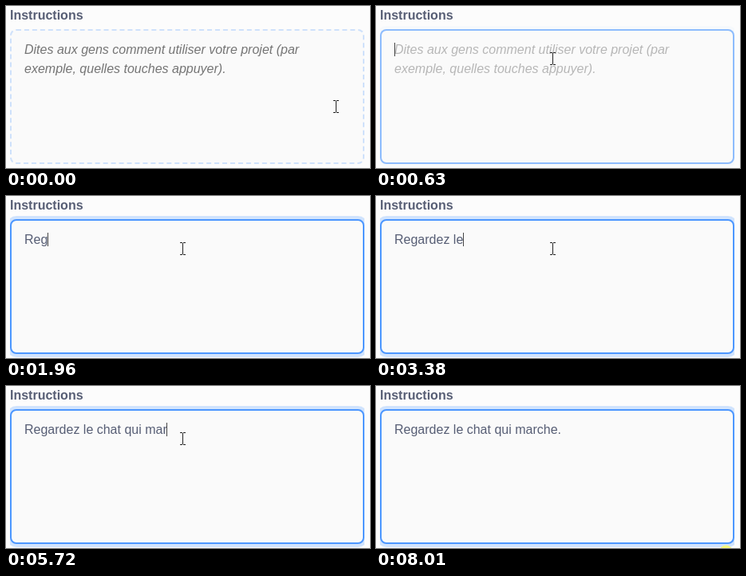
An HTML page that plays this animation: 456 by 203 pixels, repeating every 8090 ms.

```html
<!DOCTYPE html>
<html lang="fr">
<head>
<meta charset="utf-8">
<title>Instructions</title>
<style>
  html, body { margin: 0; width: 100%; height: 100%; overflow: hidden; background: #fcfcfc; }
  #stage { position: relative; width: 456px; height: 203px; overflow: hidden; }
  #clip { position: absolute; left: 5px; top: 20px; width: 444px; height: 183px; overflow: hidden; }
  #field {
    box-sizing: border-box; position: absolute; top: 9px; width: 444px; height: 169px;
    border: 2px dashed; border-radius: 8px; background: #fafafa;
  }
  svg { position: absolute; left: 0; top: 0; }
  text { font: 16px "Liberation Sans", Arial, sans-serif; fill: #575e75; white-space: pre; }
  .title { font-weight: bold; }
  #hint text { font-style: italic; fill: #757575; }
  #pointer { fill: none; stroke: #222; shape-rendering: crispEdges; }
  #caret { fill: #444; shape-rendering: crispEdges; }
</style>
</head>
<body>
<div id="stage">
  <div id="clip"><div id="field"></div></div>
  <svg width="456" height="203">
    <text class="title" x="5" y="17">Instructions</text>
    <g id="hint">
      <text x="23" y="60">Dites aux gens comment utiliser votre projet (par</text>
      <text x="23" y="84">exemple, quelles touches appuyer).</text>
    </g>
    <text id="typed" x="23" y="60"></text>
    <rect id="caret" y="46" width="1" height="17"/>
    <path id="pointer" d="M-3-7.5h3m1 0h3M.5-7v14M-3 7.5h3m1 0h3"/>
    <circle id="click" cx="438.5" cy="208.5" r="9" fill="#ffff50" opacity=".75"/>
  </svg>
</div>
<script>
const LOOP = 8090, TICK = 80, TEXT_X = 23;
const SENTENCE = 'Regardez le chat qui marche.';
const KEY_TIMES = [
  1330, 1730, 1960, 2130, 2340, 2540, 2750,
  2900, 3060, 3220, 3380, 3520, 3660, 3790, 3920,
  4070, 4230, 4400, 4560, 4720, 4870, 5020,
  5410, 5570, 5730, 5890, 6040, 6200
];
const CARET = [[0, 0], [630, 1], [1090, 0], [1330, 1], [6750, 0], [7230, 1], [7780, 0]];
const FOCUS = [[0, 0], [550, .12], [630, .5], [710, .82], [790, 1]];
const START = [413, 126], REST = [221, 66], EXIT = [440, 214];

const get = id => document.getElementById(id);
const field = get('field'), hint = get('hint'), typed = get('typed');
const caret = get('caret'), pointer = get('pointer'), click = get('click');
const ruler = document.createElement('canvas').getContext('2d');
ruler.font = '16px "Liberation Sans", Arial, sans-serif';

const stepAt = (steps, t) => steps.filter(([time]) => time <= t).pop()[1];
const blue = alpha => `rgba(76,151,255,${alpha})`;
const show = (node, on) => node.setAttribute('visibility', on ? 'visible' : 'hidden');

function glide(t, begin, end, from, to) {
  const ticked = begin + Math.floor((t - begin) / TICK) * TICK;
  const u = Math.min(1, Math.max(0, (ticked - begin) / (end - begin)));
  const eased = u * u * (3 - 2 * u);
  return from.map((v, i) => Math.round(v + (to[i] - v) * eased));
}

function render(t) {
  const focus = stepAt(FOCUS, t);
  field.style.borderStyle = focus ? 'solid' : 'dashed';
  field.style.borderColor = blue(.25 + .75 * focus);
  field.style.boxShadow = `0 0 0 4px ${blue(.25 * focus ** 3)}`;
  hint.setAttribute('opacity', 1 - focus);

  const text = SENTENCE.slice(0, KEY_TIMES.filter(time => time <= t).length);
  typed.textContent = text;
  caret.setAttribute('x', Math.floor(TEXT_X + ruler.measureText(text).width));
  show(caret, stepAt(CARET, t));

  const [x, y] = t < 6000 ? glide(t, -10, 470, START, REST) : glide(t, 6830, 7310, REST, EXIT);
  pointer.setAttribute('transform', `translate(${x} ${y})`);
  show(click, t >= 8010);
}

const origin = performance.now();
function frame() {
  render((performance.now() - origin) % LOOP);
  requestAnimationFrame(frame);
}
frame();
</script>
</body>
</html>
```
